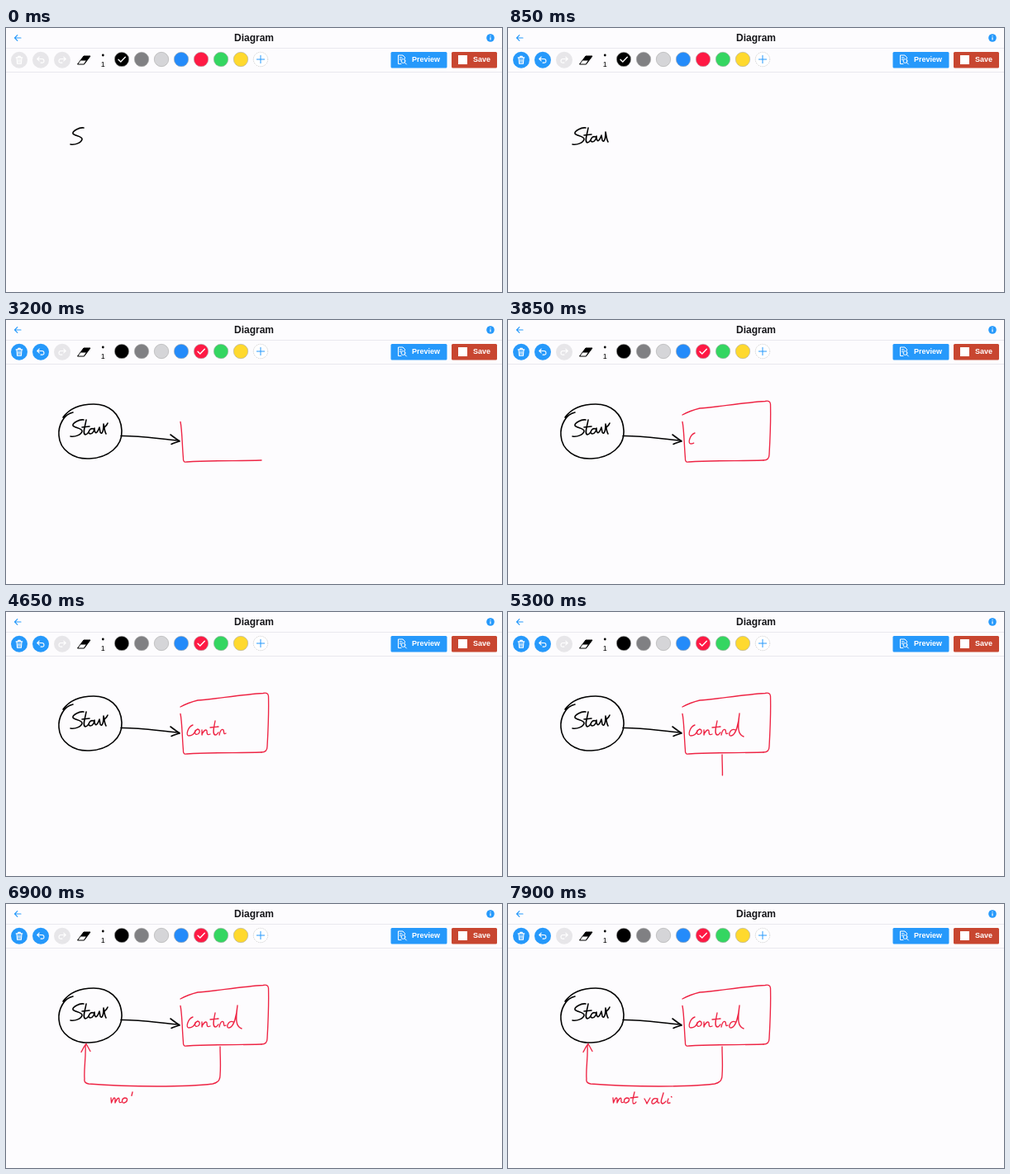
These frames come from a looping animation (600 px wide and 320 px high, 8000 ms). An HTML page:

```html
<!DOCTYPE html>
<html lang="en">
<head>
<meta charset="utf-8">
<title>Diagram</title>
<style>
html, body { margin: 0; width: 100%; height: 100%; overflow: hidden; background: #fdfcfe; }
svg { display: block; width: 600px; height: 320px; }
text { font: bold 9px "Liberation Sans", Arial, sans-serif; }
.line { fill: none; stroke-linecap: round; stroke-linejoin: round; }
</style>
</head>
<body>
<svg viewBox="0 0 600 320">
  <path d="M0 24.5H600M0 53.5H600" stroke="#e9e8ee"/>

  <g class="line" stroke="#2699fb">
    <path d="M18 12H10.5M13.8 8.7L10.5 12L13.8 15.3" stroke-width="1.1"/>
  </g>
  <text x="300" y="16" text-anchor="middle" style="font-size:12px" fill="#16161a">Diagram</text>
  <circle cx="586" cy="12" r="4.8" fill="#2699fb"/>
  <path d="M586 11.3V14.4M586 9.2V10.2" stroke="#fff" stroke-width="1.2"/>

  <g id="tools"></g>

  <g stroke="#000" stroke-linejoin="round">
    <path d="M86.5 44L94 34H102L94.5 44Z"/>
    <path d="M87.4 43.4L90.3 39.6H96.8L94 43.4Z" fill="#fff" stroke="none"/>
  </g>
  <circle cx="117.3" cy="33" r="1.4"/>
  <text x="117.3" y="47" text-anchor="middle" style="font-weight:400">1</text>

  <g id="palette"></g>
  <path id="check" class="line" d="M-4 .2L-1.2 3L4.3 -2.7" stroke="#fff" stroke-width="1.4"/>
  <circle cx="308" cy="38" r="8.7" fill="#fff" stroke="#bbb" stroke-width=".7" stroke-dasharray="1.2 1"/>
  <path d="M303 38H313M308 33V43" stroke="#2699fb"/>

  <rect x="465.5" y="29" width="68" height="19.5" rx="1.5" fill="#2699fb"/>
  <g class="line" stroke="#fff">
    <path d="M478 43.5H474.5V33H480L482.5 35.5V37M476.3 36H479M476.3 38.3H477.5"/>
    <circle cx="480.5" cy="40" r="2.4"/>
    <path d="M482.3 41.8L484.4 44"/>
  </g>
  <text x="491" y="41" fill="#fff">Preview</text>

  <rect x="539" y="29" width="55" height="19.5" rx="1.5" fill="#c84630"/>
  <rect x="547" y="33" width="11" height="11" fill="#fff"/>
  <text x="565" y="41" fill="#fff">Save</text>

  <g id="ink" class="line"></g>
</svg>
<script>
const LOOP = 8000, STEP = 50;
const BLACK = '#000', RED = '#ee2444', BLUE = '#2699fb', DISABLED = '#e7e6e9';
const byId = id => document.getElementById(id);

function add(parent, tag, attributes) {
  const node = document.createElementNS('http://www.w3.org/2000/svg', tag);
  for (const name in attributes) node.setAttribute(name, attributes[name]);
  return parent.appendChild(node);
}

const toolIcons = [
  'M-3.8 -2.8H3.8M-1.3 -2.8V-4.3H1.3V-2.8M-3 -2.8L-2.4 4.4H2.4L3 -2.8M-1 -.7V2.5M1 -.7V2.5',
  'M-1.8 -3.6L-4.2 -1.2L-1.8 1.2M-4.2 -1.2H1.5Q4 -1.2 4 1.2T1.5 3.4H0',
  'M1.8 -3.6L4.2 -1.2L1.8 1.2M4.2 -1.2H-1.5Q-4 -1.2 -4 1.2T-1.5 3.4H0'
];
const tools = toolIcons.map((icon, i) => {
  const group = add(byId('tools'), 'g', { transform: `translate(${16 + 26 * i} 38.7)` });
  const disc = add(group, 'circle', { r: 10 });
  add(group, 'path', { d: icon, class: 'line', stroke: '#fff', 'stroke-width': 1.1 });
  return disc;
});

['#000', '#808083', '#d5d5d8', '#248bfa', '#ff1944', '#34d661', '#ffd92e'].forEach((fill, i) =>
  add(byId('palette'), 'circle', { cx: 140 + 24 * i, cy: 38, r: 8.7, fill, stroke: '#aaa', 'stroke-width': .6 }));

// Pen strokes: colour, start, end, path
const strokes = [
  // Start
  [BLACK, -50, 0, 'M94 121C89 120 80 125 81 128C83 131 93 131 92 135C91 139 84 142 78 141'],
  [BLACK, 0, 250, 'M97 121C96 128 92 138 96 139C98 139 99 137 100 136'],
  [BLACK, 300, 400, 'M92 130L101 129'],
  [BLACK, 400, 850, 'M106 132C101 130 98 138 102 138C105 138 107 134 107 131C107 135 108 138 110 136C112 134 112 132 113 130C114 133 113 138 116 137C118 135 118 130 118 126C119 130 119 135 121 138'],
  [BLACK, 850, 900, 'M119 130Q122 128 123 125'],
  [BLACK, 1000, 1400, 'M81 112C70 114 63 128 64 140C65 158 82 169 101 168C124 167 141 153 140 134C139 113 124 102 106 102C90 102 77 107 69 118'],
  [BLACK, 1650, 1900, 'M139 140.5C160 140 185 144 209 146'],
  [BLACK, 2000, 2200, 'M199 139C203 142 207 145 210 147C207 148 203 149 200 150.5'],
  // Box
  [RED, 2850, 3200, 'M211 123.5C213 133 213 150 214.5 168Q214 173 219 172C250 170 280 171 309 170'],
  [RED, 3200, 3550, 'M309 170Q316 170 316 163C317 145 318 120 317.5 102Q317 97 311 98.5C285 100 250 106 232 107Q220 110 211 115'],
  // Control
  [RED, 3700, 3900, 'M226 137C220 139 217 150 221 150C225 150 228 147 229 144'],
  [RED, 3900, 4050, 'M232 142C227 144 228 150 232 148C235 146 235 143 232 142'],
  [RED, 4050, 4250, 'M237 143V149C238 145 242 141 243 144C243 147 243 150 247 148'],
  [RED, 4250, 4400, 'M253 132C252 138 249 148 253 149C255 149 256 147 257 146'],
  [RED, 4400, 4500, 'M247 140L257 139'],
  [RED, 4500, 4650, 'M258 149C259 144 261 141 263 143C264 146 263 149 266 147'],
  [RED, 4650, 5000, 'M275 143C269 140 265 151 270 150C276 149 279 134 280 123C279 134 276 148 285 151'],
  // Return arrow
  [RED, 5250, 5750, 'M259 173C259 185 260 195 259 208Q259 216 250 218C220 222 150 222 100 218Q94 217 95 212C94 200 97 185 96 171'],
  [RED, 5950, 6150, 'M91 179.5Q94 173 97 169.5L102 178.5'],
  // not vali
  [RED, 6400, 6650, 'M127 235L127.5 241C129 237 131 233 132 236V241C134 236 137 233 137 237Q136 242 140 240'],
  [RED, 6650, 6850, 'M144 235C139 236 140 242 143 241C147 240 148 235 144 235'],
  [RED, 6850, 7050, 'M153 228C152 233 149 241 152 242Q154 242 155 240'],
  [RED, 7050, 7150, 'M148 235L157 234'],
  [RED, 7150, 7350, 'M165 236Q167 239 168 242Q170 238 172 235'],
  [RED, 7350, 7550, 'M180 236C174 234 172 243 176 242C179 241 181 238 181 236Q180 242 183 241'],
  [RED, 7550, 7750, 'M188 229C187 234 183 241 187 242Q190 241 191 239'],
  [RED, 7750, 7850, 'M194 236Q191 243 196 241'],
  [RED, 7850, 7900, 'M197.5 233.5L198 234']
].map(([stroke, start, end, d]) => ({
  start, end,
  path: add(byId('ink'), 'path', {
    d, stroke, pathLength: 1, 'stroke-dasharray': '1 2', 'stroke-width': stroke === RED ? 1.35 : 1.6
  })
}));

function draw(time) {
  const t = Math.floor(time % LOOP / STEP) * STEP;
  for (const { start, end, path } of strokes) {
    const progress = Math.min(1, (t - start) / (end - start));
    path.style.visibility = progress > 0 ? 'visible' : 'hidden';
    path.style.strokeDashoffset = 1 - Math.max(0, progress);
  }
  tools.forEach((disc, i) => disc.setAttribute('fill', i < 2 && t >= 50 ? BLUE : DISABLED));
  byId('check').setAttribute('transform', `translate(${t < 2450 ? 140 : 236} 38)`);
}

const origin = performance.now();
function tick() {
  draw(performance.now() - origin);
  requestAnimationFrame(tick);
}
tick();
</script>
</body>
</html>
```
